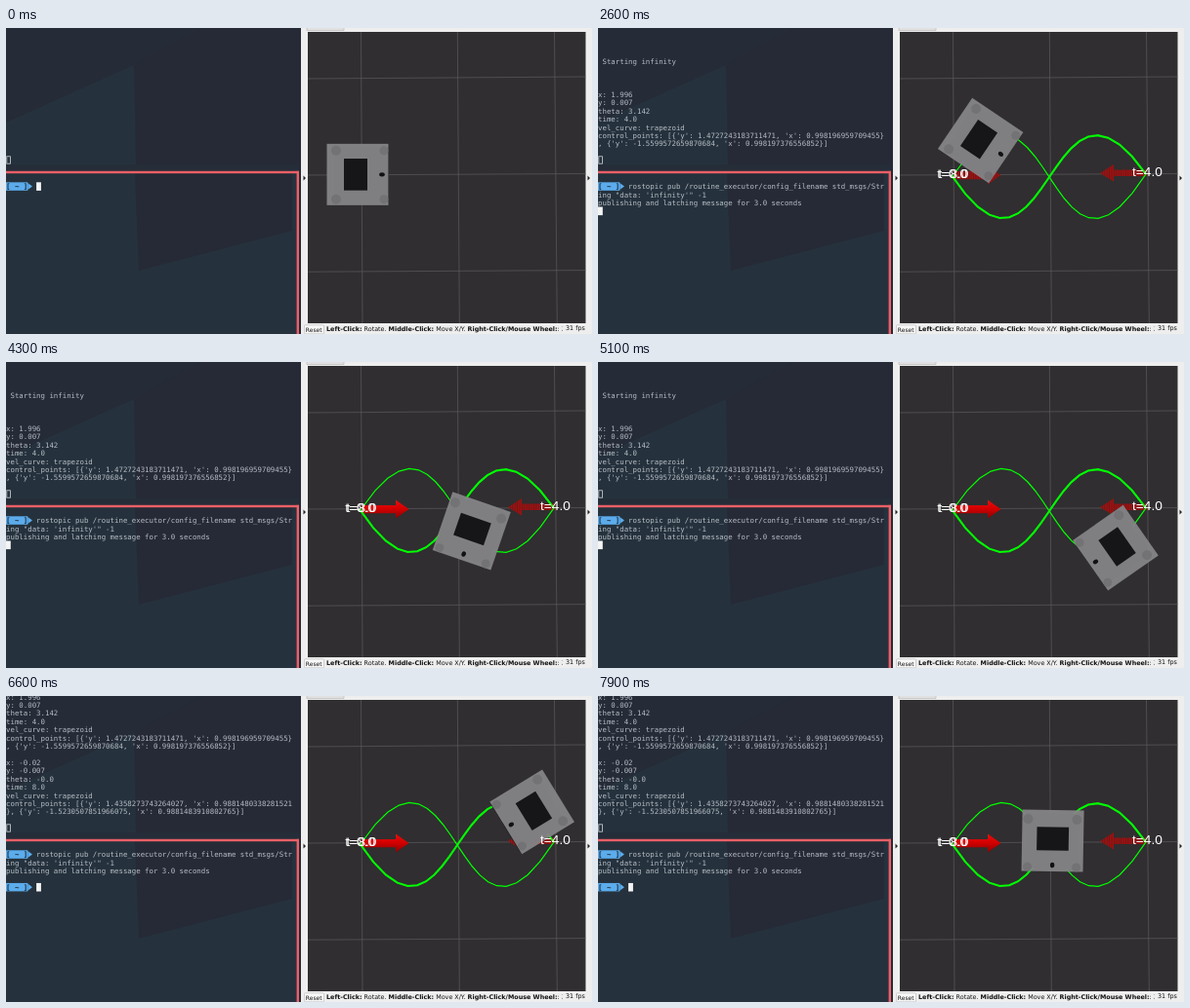
An HTML page that plays this animation: 600x314 px, repeating every 8 s.

```html
<!DOCTYPE html>
<html lang="en">
<head>
<meta charset="utf-8">
<title>Infinity path</title>
<style>
  html, body { margin: 0; width: 100%; height: 100%; overflow: hidden; background: #242a36; }
  svg { display: block; width: 600px; height: 314px; }
  text { white-space: pre; }
  .term text { font: 7.38px "DejaVu Sans Mono", monospace; fill: #b6bcc5; }
  .term .prompt { fill: #172535; font-weight: bold; }
  .bar text { font: 6.4px "DejaVu Sans", sans-serif; fill: #111; }
  .bar .bold { font-weight: bold; }
  .label { font: 13.7px "Liberation Sans", Arial, sans-serif; fill: #fff; }
  .grid { stroke: #5d5b5d; stroke-width: .7; }
</style>
</head>
<body>
<svg viewBox="0 0 600 314">
  <defs>
    <clipPath id="viewClip"><rect x="309" y="4" width="284.5" height="299"/></clipPath>
    <clipPath id="topClip"><rect width="300" height="147"/></clipPath>
    <clipPath id="hintClip"><rect x="326" y="303" width="243.5" height="11"/></clipPath>
    <linearGradient id="red" x2="0" y2="1">
      <stop offset="0" stop-color="#e01010"/><stop offset=".45" stop-color="#d60000"/><stop offset="1" stop-color="#8a0000"/>
    </linearGradient>
    <pattern id="stripes" width="2.4" height="4" patternUnits="userSpaceOnUse">
      <rect width="2.4" height="4" fill="#a01212"/><rect width="1" height="4" fill="#6f1515"/>
    </pattern>
  </defs>

  <rect width="302" height="314" fill="#262a37"/>
  <path d="M0 0H200L131 38L0 97Z" fill="#252b37"/>
  <path d="M0 97L131 38L133 140H0Z" fill="#25323d"/>
  <rect y="140" width="300" height="7" fill="#252d39"/>
  <rect y="149" width="300" height="165" fill="#25323d"/>
  <path d="M132 149H293V208L136 249Z" fill="#262a37"/>

  <g class="term" clip-path="url(#topClip)"><g id="log"></g></g>
  <rect x=".8" y="131.8" width="3.6" height="7.4" fill="none" stroke="#cfd3d8" stroke-width=".8"/>
  <g class="term" id="shell"></g>
  <rect id="cursor" width="4.8" height="8.6" fill="#f4f4f4"/>

  <rect y="146.8" width="300" height="2.4" fill="#ee5f66"/>
  <rect x="297.6" y="146.8" width="2.4" height="168" fill="#ee5f66"/>

  <rect x="302" width="298" height="314" fill="#efeeef"/>
  <path d="M308 0V2.5H346V0" fill="#e2e1e2" stroke="#bbb" stroke-width=".7"/>
  <path d="M304.5 151.5L307 154L304.5 156.5ZM595.5 151.5L598 154L595.5 156.5Z" fill="#222"/>
  <rect x="309" y="4" width="284.5" height="299" fill="#302e30"/>

  <g clip-path="url(#viewClip)">
    <path class="grid" d="M363.5 4L365 303M462.3 4L464.3 303M561.5 4L564.3 303M309 52L594 50M309 151L594 149.5M309 250.2L594 248.6"/>
    <g id="plan">
      <path id="rightArrow" d="M562 145.5V152H528V157.5L514 149L528 140V145.5Z" fill="url(#stripes)"/>
      <path id="leftArrow" d="M364 147V155.3H399V160.5L412.5 151L399 141.5V147Z"/>
      <path id="outward" fill="none" stroke="#0f0" stroke-width="1.2"/>
      <path id="inward" fill="none" stroke="#0f0" stroke-width="2.1"/>
    </g>
    <rect id="base" x="-28" y="-28" width="56" height="56" fill="#1b1a1c"/>
    <g id="robot">
      <rect x="-31.5" y="-31.5" width="63" height="63" fill="#858487" fill-opacity=".94"/>
      <g fill="#737275">
        <circle cx="-22" cy="-24.5" r="5"/><circle cx="-22" cy="25.5" r="5"/>
        <circle cx="27" cy="-24.5" r="4.5"/><circle cx="27" cy="25.5" r="4.5"/>
      </g>
      <rect x="-14" y="-16.3" width="24" height="32.6" fill="#161517"/>
      <ellipse cx="25" rx="2.8" ry="2.2" fill="#111"/>
    </g>
    <g id="labels">
      <text class="label" x="347.3" y="154">t=0.0</text>
      <text class="label" x="348.6" y="153.7">t=8.0</text>
      <text class="label" x="547" y="151.5">t=4.0</text>
    </g>
  </g>

  <g class="bar">
    <rect x="305.5" y="304.8" width="20" height="9" rx="1" fill="#f8f8f8" stroke="#b5b5b5" stroke-width=".6"/>
    <text x="306.8" y="311.8" style="font-size:6px">Reset</text>
    <g clip-path="url(#hintClip)">
      <text x="328" y="311.4"><tspan class="bold">Left-Click:</tspan> Rotate. <tspan class="bold">Middle-Click:</tspan> Move X/Y. <tspan class="bold">Right-Click/Mouse Wheel:</tspan>: Zoom. <tspan class="bold">Shift</tspan>: More options.</text>
    </g>
    <text x="573" y="310.2">31 fps</text>
  </g>
</svg>
<script>
const LOOP = 8000, STEP = 100;
const CHAR = 4.443, ROW = 8.41, COLUMNS = 66, PROMPT = 7;
const COMMAND = `rostopic pub /routine_executor/config_filename std_msgs/String "data: 'infinity'" -1`;
const TYPED = 1300, ENTER = 1500, PUBLISH = 1700, START = 1800, DONE = 5300, RETURN = 5900;
const $ = id => document.getElementById(id);

function add(parent, tag, attrs, content = "") {
  const el = document.createElementNS("http://www.w3.org/2000/svg", tag);
  for (const key in attrs) el.setAttribute(key, attrs[key]);
  el.textContent = content;
  return parent.appendChild(el);
}
const show = (el, on) => el.setAttribute("visibility", on ? "visible" : "hidden");

// Upper terminal: rows are counted from the top before it scrolls.
const LOG = `    
 Starting infinity



x: 1.996
y: 0.007
theta: 3.142
time: 4.0
vel_curve: trapezoid
control_points: [{'y': 1.4727243183711471, 'x': 0.998196959709455}
, {'y': -1.5599572659870684, 'x': 0.998197376556852}]

x: -0.02
y: -0.007
theta: -0.0
time: 8.0
vel_curve: trapezoid
control_points: [{'y': 1.4358273743264027, 'x': 0.9881480338281521
}, {'y': -1.5230507851966075, 'x': 0.9881483910802765}]`.split("\n");
const logRows = LOG.map((line, i) => add($("log"), "text", { x: 0, y: 3.6 + ROW * (i + 3) }, line));

// Lower terminal
const rowY = row => 162.5 + ROW * row;
const shellText = (row, content, column = 0) =>
  add($("shell"), "text", { x: column * CHAR, y: rowY(row) + 2.6 }, content);
function addPrompt(row) {
  const g = add($("shell"), "g", {}), y = rowY(row);
  add(g, "rect", { x: 0, y: y - 4.2, width: 22.3, height: 8.5, fill: "#5cacec" });
  add(g, "path", { d: `M22.3 ${y - 3.6}L27 ${y}L22.3 ${y + 3.6}Z`, fill: "#5cacec" });
  add(g, "text", { class: "prompt", x: 0, y: y + 2.6 }, "[ ~ ]");
  return g;
}
addPrompt(0);
const nextPrompt = addPrompt(4);
const typedRows = [shellText(0, "", PROMPT), shellText(1, "")];
const published = shellText(2, "publishing and latching message for 3.0 seconds");

function placeCursor(column, row) {
  $("cursor").setAttribute("x", column * CHAR);
  $("cursor").setAttribute("y", rowY(row) - 4.2);
}

// Cubic curves in metres, drawn as short segments
const toScreen = ([x, y]) => [364 + 98.7 * x, 150.5 - 98.7 * y];
function curvePath(a, b, c, d) {
  const points = Array.from({ length: 21 }, (_, i) => {
    const s = i / 20, r = 1 - s;
    const mix = k => r ** 3 * a[k] + 3 * r * r * s * b[k] + 3 * r * s * s * c[k] + s ** 3 * d[k];
    return toScreen([mix(0), mix(1)]).map(v => v.toFixed(2)).join(" ");
  });
  return "M" + points.join("L");
}
const far = [1.996, 0.007];
$("outward").setAttribute("d", curvePath([0, 0], [.998, 1.473], [.998, -1.56], far));
$("inward").setAttribute("d", curvePath(far, [.988, 1.436], [.988, -1.523], [-.02, -.007]));

function track(keys, t) {
  if (t <= keys[0][0]) return keys[0][1];
  for (let i = 1; i < keys.length; i++) {
    const [t0, v0] = keys[i - 1], [t1, v1] = keys[i];
    if (t <= t1) return v0 + (v1 - v0) * (t - t0) / (t1 - t0);
  }
  return keys[keys.length - 1][1];
}
const PROGRESS = [[1850, 0], [2050, .032], [2600, .167], [4300, .582], [5650, .96], [5800, .992], [5900, 1],
                  [6050, 1.02], [6600, 1.146], [7900, 1.475], [8000, 1.5]];
const HEADING = [[1840, 0], [2600, 34], [4300, 109], [5800, 176.5], [5880, 180], [6600, 148.5], [7900, 91], [8000, 86.6]];

function drawRobot(t) {
  const progress = track(PROGRESS, t), heading = track(HEADING, t);
  const path = progress < 1 ? $("outward") : $("inward");
  const p = path.getPointAtLength(path.getTotalLength() * (progress < 1 ? progress : progress - 1));
  // The raised top is pushed away from the view centre.
  const x = 451 + (p.x - 451) * 1.046, y = 154 + (p.y - 154) * 1.046;
  $("base").setAttribute("transform", `translate(${p.x} ${p.y}) rotate(${heading})`);
  $("robot").setAttribute("transform", `translate(${x} ${y}) rotate(${heading})`);
}

function drawShell(t) {
  const count = Math.min(COMMAND.length, Math.floor(COMMAND.length * t / TYPED));
  const typed = COMMAND.slice(0, count), room = COLUMNS - PROMPT;
  typedRows[0].textContent = typed.slice(0, room);
  typedRows[1].textContent = typed.slice(room);
  show(published, t >= PUBLISH);
  show(nextPrompt, t >= DONE);
  if (t >= DONE) placeCursor(PROMPT, 4);
  else if (t >= PUBLISH) placeCursor(0, 3);
  else if (t >= ENTER) placeCursor(0, 2);
  else placeCursor((PROMPT + count) % COLUMNS, Math.floor((PROMPT + count) / COLUMNS));
}

function draw(t) {
  drawShell(t);
  logRows.forEach((row, i) => show(row, t >= (i < 13 ? START : RETURN)));
  $("log").setAttribute("transform", `translate(0 ${t >= RETURN ? -8 * ROW : 0})`);
  show($("plan"), t >= START);
  show($("labels"), t >= START);
  $("leftArrow").setAttribute("fill", t < 3000 ? "url(#stripes)" : "url(#red)");
  drawRobot(t);
}

const began = performance.now();
function tick() {
  const t = (performance.now() - began) % LOOP;
  draw(Math.floor(t / STEP) * STEP);
  requestAnimationFrame(tick);
}
tick();
</script>
</body>
</html>
```
